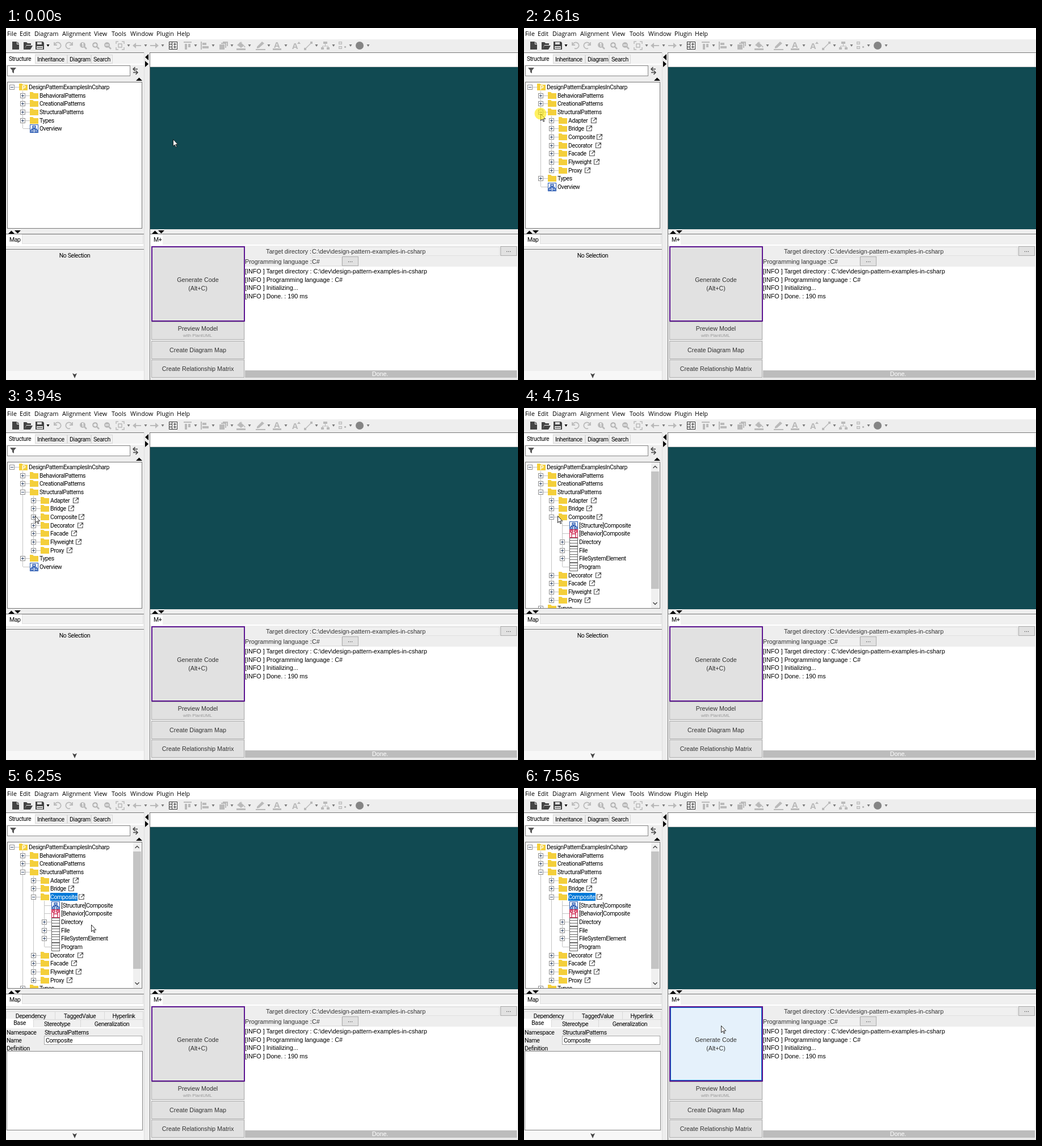
An HTML page for the animation above (8 s loop, 902 px wide and 621 px high).

```html
<!DOCTYPE html>
<html lang="en">
<head>
<meta charset="utf-8">
<style>
  html, body { margin: 0; width: 100%; height: 100%; overflow: hidden; background: #eee; }
  svg { display: block; width: 100%; height: 100%; }
  text { white-space: pre; fill: #000; }
  .menu { font: 10.7px "Open Sans", sans-serif; }
  .ui { font: 10.5px Roboto, sans-serif; letter-spacing: -.4px; }
  .arial { font: 10.75px "Liberation Sans", sans-serif; }
  .mid { text-anchor: middle; }
  .bold { font-weight: bold; }
  .letter { font: bold 15px "Open Sans", sans-serif; }
  .small { font-size: 7.9px; }
</style>
</head>
<body>
<svg id="stage" viewBox="0 0 902 621"></svg>
<script>
const LOOP = 8000;
const stage = document.getElementById('stage');

// Drawing helpers, all returning SVG markup
const rect = (x, y, w, h, fill) => `<rect x="${x}" y="${y}" width="${w}" height="${h}" fill="${fill}"/>`;
const box = (x, y, w, h, fill, stroke = '#adadad') =>
  `<rect x="${x + .5}" y="${y + .5}" width="${w - 1}" height="${h - 1}" fill="${fill}" stroke="${stroke}"/>`;
const line = (d, stroke = '#888', width = 1) => `<path d="${d}" fill="none" stroke="${stroke}" stroke-width="${width}"/>`;
const shape = (d, fill = '#000') => `<path d="${d}" fill="${fill}"/>`;
const text = (x, y, str, cls = 'ui', fill = '#000') => `<text x="${x}" y="${y}" class="${cls}" style="fill:${fill}">${str}</text>`;
const group = (id, content) => `<g id="${id}">${content}</g>`;
const up = (x, y) => shape(`M${x - 5} ${y + 3}h11l-5.500-5.500z`);
const down = (x, y) => shape(`M${x - 5} ${y - 3}h11l-5.500 5.500z`);

function menuAndToolbar() {
  const menus = [['File', 2], ['Edit', 24], ['Diagram', 50], ['Alignment', 99], ['View', 155],
    ['Tools', 186], ['Window', 219], ['Plugin', 265], ['Help', 301]];
  const grey = '#bababa', dark = '#444';
  const caret = (x, fill = '#777') => shape(`M${x - 2.5} 29h5l-2.500 4z`, fill);
  const lens = (x, mark) => `<circle cx="${x - 1}" cy="30" r="5" fill="${grey}"/>` +
    line(`M${x + 2} 33l4 4`, grey, 2.5) + line(mark, '#fff', 1.3);
  return rect(0, 0, 902, 20, '#fff') + rect(0, 20, 902, 23, '#eee') +
    menus.map(([label, x]) => text(x, 14, label, 'menu')).join('') +
    shape('M11 24h8v5h4v9h-12zM20 24l3 4h-3z', dark) +
    shape('M31 38v-13h5l2 2h6v3h-8l-4 8zM36 31h11l-4 7h-11z', dark) +
    shape('M52 24h13l2 2v12h-15z', dark) + rect(55, 25, 8, 4, '#ddd') + rect(54, 32, 11, 5, '#ddd') + rect(55, 34, 9, 1, dark) +
    caret(74, '#000') +
    line('M85 25v5h5M86 29a5.500 5.500 0 1 1 3 7', grey, 1.8) +
    line('M117 25v5h-5M116 29a5.500 5.500 0 1 0 -3 7', grey, 1.8) +
    lens(136, 'M134 28l1.500-1v6') + lens(158, 'M154 30h6m-3-3v6') + lens(179, 'M175 30h6') +
    line('M194 28v-4h4m6 0h4v4m0 6v4h-4m-6 0h-4v-4M198 28h6v6h-6z', grey, 1.5) + caret(216) +
    shape('M223 31l6-5v4h9v2h-9v4z', grey) + caret(246) +
    shape('M269 31l-6-5v4h-9v2h9v4z', grey) + caret(276) +
    box(287, 24, 15, 14, '#fff', '#333') +
    line('M292.500 24v14M288 28.500h4M288 33.500h4M295 28.500h5m-5 5h5M297.500 26v10', '#333') +
    shape('M313 24h14v2h-14zM315 28h4v10h-4zM321 28h4v6h-4z', grey) + caret(334) +
    shape('M343 24h2v14h-2zM346 26h7v4h-7zM346 32h11v4h-11z', grey) + caret(365) +
    shape('M376 29h9v9h-9zM379 26h9v9h-2v-7h-7zM382 24h9v8h-2v-6h-7z', grey) + caret(398) +
    shape('M407 30l6-5 7 6-6 4zM406 36h16v3h-16zM420 31l2 3h-3z', grey) + line('M411 27a3 3 0 0 1 5-1', grey) + caret(429) +
    shape('M442 33l9-9 4 3-9 8-4 1zM440 37h17v2h-17z', grey) + caret(463) +
    text(472, 35, 'A', 'letter', grey) + rect(470, 36, 15, 3, grey) + caret(493) +
    text(504, 37, 'A', 'letter', grey) + shape('M513 28l3-4 3 4z', grey) +
    line('M527 37l11-11', grey, 1.5) + rect(525, 35, 4, 4, grey) + rect(536, 24, 4, 4, grey) + caret(547) +
    line('M562.500 27v5m-5 3v-3h10v3', grey) + rect(559, 24, 7, 4, grey) + rect(555, 34, 5, 4, grey) + rect(565, 34, 5, 4, grey) + caret(577) +
    box(586, 24, 6, 5, '#ddd', grey) + box(586, 32, 6, 5, '#ddd', grey) + rect(596, 32, 3, 3, grey) + caret(607) +
    '<circle cx="623" cy="31" r="7" fill="#858585"/>' + caret(638);
}

function leftPanel() {
  const tab = (x, w, label) => box(x, 47, w, 16, '#f0f0f0', '#d9d9d9') + text(x + 4, 59, label);
  return rect(0, 43, 244, 1, '#777') + rect(0, 44, 244, 20, '#f4f4f4') + rect(0, 45, 51, 20, '#fff') +
    text(5, 58, 'Structure') + tab(51, 57, 'Inheritance') + tab(108, 42, 'Diagram') + tab(150, 38, 'Search') +
    rect(0, 63, 244, 2, '#fff') + box(2, 66, 217, 19, '#fff', '#888') +
    shape('M7 70h11l-4 5v5l-3-2v-3z', '#555') +
    line('M232 72.500h-8m3.500-3.500l-3.500 3.500 3.500 3.500M224 78.500h8m-3.500-3.500l3.500 3.500-3.500 3.500', '#444', 1.5) + up(234, 90) +
    box(2, 95, 238, 259, '#fff', '#777') +
    up(9, 360) + down(20, 360) + rect(0, 363, 244, 1, '#777') +
    rect(0, 364, 28, 18, '#fff') + box(28, 364, 214, 17, '#f0f0f0', '#e0e0e0') + text(6, 377, 'Map') +
    rect(0, 381, 242, 5, '#fff') + rect(0, 385, 242, 1, '#ddd') + rect(0, 390, 244, 1, '#777') +
    rect(0, 605, 244, 16, '#f7f7f7') + shape('M117 609l4 2 4-2-4 9z', '#444') +
    rect(243, 43, 1, 578, '#ddd') + rect(244, 43, 9, 578, '#eee') +
    shape('M251 46v11l-6-5.500zM245 58v11l6-5.500z');
}

function rightPanel() {
  const label = (y, str) => text(338, y, str, 'arial mid', '#333');
  const dots = (x, y) => box(x, y, 29, 17, '#e1e1e1') + text(x + 14.5, y + 10, '...', 'arial mid', '#333');
  const log = ['Target directory : C:\\dev\\design-pattern-examples-in-csharp',
    'Programming language : C#', 'Initializing...', 'Done. : 190 ms'];
  return rect(253, 43, 649, 1, '#777') + rect(253, 43, 1, 578, '#777') +
    rect(254, 44, 648, 25, '#fff') + rect(900, 45, 1, 23, '#ddd') + rect(254, 68, 648, 1, '#ccc') +
    rect(254, 69, 648, 286, '#114a52') + up(262, 360) + down(273, 360) +
    rect(254, 363, 648, 1, '#777') + rect(254, 364, 648, 20, '#f0f0f0') + rect(254, 364, 22, 20, '#fff') +
    text(260, 377, 'M+') + rect(254, 382, 648, 2, '#fff') +
    rect(256, 385, 165, 133, '#e1e1e1') +
    group('hover', box(258, 387, 161, 129, '#e5f1fb', '#0078d7')) +
    '<rect x="257" y="386" width="163" height="131" fill="none" stroke="#5c1491" stroke-width="2"/>' +
    label(448, 'Generate Code') + label(463, '(Alt+C)') +
    [518, 552, 585].map(y => box(256, y, 164, 32, '#e1e1e1')).join('') +
    label(534, 'Preview Model') + label(572, 'Create Diagram Map') + label(605, 'Create Relationship Matrix') +
    text(337.5, 545, 'with PlantUML', 'arial mid small', '#999') +
    box(539, 386, 331, 16, '#f0f0f0', '#e0e0e0') + box(539, 404, 53, 16, '#f0f0f0', '#e0e0e0') +
    text(458, 398, 'Target directory :', 'arial', '#333') +
    text(539, 398, 'C:\\dev\\design-pattern-examples-in-csharp', 'arial', '#333') +
    text(421, 416, 'Programming language :', 'arial', '#333') + text(539, 416, 'C#', 'arial', '#333') +
    dots(871, 385) + dots(592, 403) +
    rect(421, 421, 479, 183, '#fff') +
    log.map((str, i) => text(421, 433 + i * 14.67, '[INFO ] ' + str, 'arial')).join('') +
    rect(421, 604, 479, 13, '#bcbcbc') + text(659, 614, 'Done.', 'arial mid', '#fff') +
    rect(254, 619, 648, 1, '#ddd');
}

function properties() {
  const tab = (x, y, w, str) => box(x, y, w, 15, '#f0f0f0', '#d9d9d9') + text(x + w / 2, y + 11.5, str, 'ui mid');
  return rect(0, 391, 242, 214, '#eee') +
    tab(0, 394, 87, 'Dependency') + tab(86, 394, 88, 'TaggedValue') + tab(173, 394, 69, 'Hyperlink') +
    tab(48, 408, 84, 'Stereotype') + tab(131, 408, 111, 'Generalization') +
    rect(0, 407, 48, 17, '#fff') + text(24, 418, 'Base', 'ui mid') + rect(0, 422, 242, 2, '#fff') +
    text(1, 435, 'Namespace') + text(68, 435, 'StructuralPatterns') +
    text(1, 449, 'Name') + box(67, 437, 173, 16, '#fff', '#aaa') + text(70, 449, 'Composite') +
    text(1, 463, 'Definition') + box(1, 464, 240, 140, '#fff', '#888');
}

// Tree rows: depth, icon, label, expander ('+', '-' or none), x of the link mark
const patterns = [['Adapter', 118], ['Bridge', 110], ['Composite', 128], ['Decorator', 126],
  ['Facade', 115], ['Flyweight', 123], ['Proxy', 107]];
const compositeParts = [[3, 'structure', '[Structure]Composite'], [3, 'behavior', '[Behavior]Composite'],
  [3, 'class', 'Directory', '+'], [3, 'class', 'File', '+'],
  [3, 'class', 'FileSystemElement', '+'], [3, 'class', 'Program']];

function treeRows(openPatterns, openComposite) {
  const children = patterns.flatMap(([name, link]) => {
    const open = openComposite && name === 'Composite';
    return [[2, 'folder', name, open ? '-' : '+', link], ...(open ? compositeParts : [])];
  });
  return [[0, 'project', 'DesignPatternExamplesInCsharp', '-'],
    [1, 'folder', 'BehavioralPatterns', '+'], [1, 'folder', 'CreationalPatterns', '+'],
    [1, 'folder', 'StructuralPatterns', openPatterns ? '-' : '+'],
    ...(openPatterns ? children : []),
    [1, 'folder', 'Types', '+'], [1, 'structure', 'Overview']];
}

const folder = (x, y) => shape(`M${x} ${y - 6}h5l2 2h8v10h-15z`, '#f4cf3b');
const diagram = (x, y, color, inner) => box(x, y - 7, 15, 15, '#fff', color) + line(inner, color, 1.3);
const icons = {
  folder,
  project: (x, y) => folder(x, y) + text(x + 5, y + 5, 'P', 'ui bold', '#fff'),
  structure: (x, y) => diagram(x, y, '#2456b0',
    `M${x + 5} ${y - 4}h5v3h-5zM${x + 7.5} ${y - 1}v3m-4 1v-2h8v2M${x + 2} ${y + 3}h4v3h-4zM${x + 9} ${y + 3}h4v3h-4z`),
  behavior: (x, y) => diagram(x, y, '#cc1f4a',
    `M${x + 2} ${y - 5}h4v3h-4zM${x + 9} ${y - 5}h4v3h-4zM${x + 4} ${y - 2}v9m7-9v9M${x + 4} ${y + 1}h7`),
  class: (x, y) => box(x, y - 7, 15, 15, '#fff', '#666') + line(`M${x} ${y - 2.5}h15m-15 5h15`, '#666')
};

function tree(rows) {
  const rowY = i => Math.round(104 + i * 14.67);
  let lines = '', marks = '';
  rows.forEach(([depth, icon, label, expander, link], i) => {
    const y = rowY(i), x = 11 + 19 * depth, iconX = 23 + 19 * depth;
    if (depth) {
      const parent = rows.slice(0, i).findLastIndex(row => row[0] === depth - 1);
      lines += line(`M${x - .5} ${rowY(parent) + 7}V${y}`, '#c4c4c4');
    }
    lines += line(`M${x} ${y + .5}H${iconX}`, '#c4c4c4');
    if (expander) {
      marks += box(x - 5, y - 4, 9, 9, '#fff', '#919191') +
        line(`M${x - 3} ${y + .5}h5` + (expander === '+' ? `M${x - .5} ${y - 2}v5` : ''), '#34496b');
    }
    marks += icons[icon](iconX, y) + text(40 + 19 * depth, y + 4, label);
    if (link) {
      marks += line(`M${link + 4} ${y - 4}h-3.500v8.500h8.500v-3.500M${link + 4} ${y + 1}l5-5m-4 -.5h4.500v4.500`, '#555', 1.2);
    }
  });
  return lines + marks;
}

stage.innerHTML = '<clipPath id="treeClip"><rect x="3" y="96" width="236" height="257"/></clipPath>' +
  rect(0, 0, 902, 621, '#eee') + menuAndToolbar() + leftPanel() + rightPanel() +
  '<g clip-path="url(#treeClip)">' +
  group('treeClosed', tree(treeRows(false, false))) +
  group('treePatterns', tree(treeRows(true, false))) +
  group('treeComposite', tree(treeRows(true, true)) +
    rect(224, 96, 14, 257, '#f0f0f0') + group('thumb', rect(224, 112, 14, 207, 'inherit')) +
    line('M227.500 106l3.500-3.500 3.500 3.500M227.500 343l3.500 3.500 3.500-3.500', '#444', 1.4)) +
  group('selection', rect(78, 185, 48, 14, '#0078d7') + text(78, 196, 'Composite', 'ui', '#fff')) + '</g>' +
  group('noSelection', text(121, 405, 'No Selection', 'ui mid')) + group('properties', properties()) +
  group('arrow', '<path d="M.5 .5v12l2.700-2.600 2 4.300 1.700-.8-2-4.100h3.800z" fill="#fff" stroke="#111" stroke-width=".9"/>') +
  group('resize', shape('M236 334.500l4-3.500v2.500h9v-2.500l4 3.500-4 3.500v-2.500h-9v2.500z')) +
  group('click', '<circle r="10.500" fill="#ffe800" fill-opacity=".62"/>');

// Pointer moves: first step, last step, step count, then the points of a quadratic curve
const moves = [
  [1000, 1770, 11, [294, 196], [207, 162], [81, 159]],
  [1850, 2150, 5, [81, 159], [50, 155], [29, 151]],
  [2920, 3710, 11, [29, 151], [36, 170], [48, 186]],
  [3800, 3940, 3, [48, 186], [50, 188], [51, 190]],
  [4710, 5250, 8, [51, 190], [82, 192], [108, 193]],
  [6030, 6790, 11, [108, 193], [160, 257], [244, 334]],
  [6860, 7560, 10, [244, 334], [315, 390], [347, 419]]
];
const clicks = [[2610, 2690], [4170, 4250], [5480, 5630]];

function pointerAt(t) {
  const [start, end, steps, a, b, c] = moves.findLast(move => t >= move[0]) || moves[0];
  // Steps are rounded to 10 ms, so allow each one to arrive slightly early
  const step = t < start ? 0 : Math.floor((t - start) / (end - start) * (steps - 1) + .1) + 1;
  const u = Math.min(step, steps) / steps;
  return [0, 1].map(i => Math.round((1 - u) ** 2 * a[i] + 2 * u * (1 - u) * b[i] + u * u * c[i]));
}

const part = id => document.getElementById(id);
const show = (id, visible) => part(id).style.display = visible ? '' : 'none';
const moveTo = (id, x, y) => part(id).setAttribute('transform', `translate(${x} ${y})`);

function render(t) {
  const [x, y] = pointerAt(t);
  const selected = t >= 5480, resizing = t >= 6790 && t < 6860;
  show('treeClosed', t < 2610);
  show('treePatterns', t >= 2610 && t < 4170);
  show('treeComposite', t >= 4170);
  show('selection', selected);
  show('properties', selected);
  show('noSelection', !selected);
  show('hover', x >= 257 && y >= 386);
  show('arrow', !resizing);
  show('resize', resizing);
  show('click', clicks.some(([from, to]) => t >= from && t < to));
  part('thumb').setAttribute('fill', x >= 224 && x < 239 && y < 325 ? '#a6a6a6' : '#c4c4c4');
  moveTo('arrow', x, y);
  moveTo('click', x, y);
}

const origin = performance.now();
function tick() {
  render((performance.now() - origin) % LOOP);
  requestAnimationFrame(tick);
}
render(0);
tick();
</script>
</body>
</html>
```
